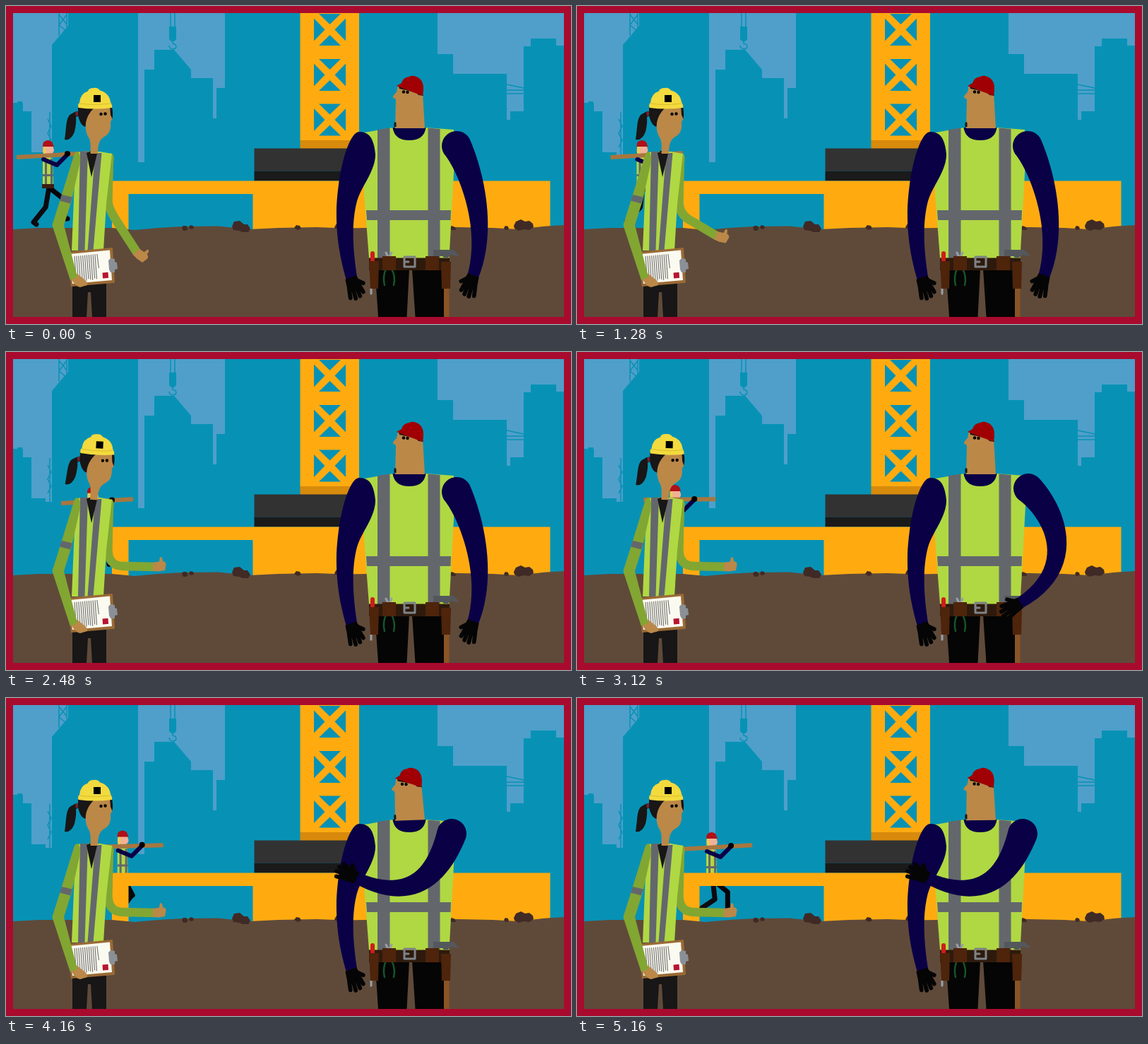
Animation, 800 px wide and 450 px high, one loop 5200 ms. Source, as an HTML page:

```html
<!DOCTYPE html>
<html lang="en">
<head>
<meta charset="utf-8">
<title>Building site</title>
<style>
  html, body { margin: 0; width: 100%; height: 100%; overflow: hidden; background: #a80b2d; }
  svg { display: block; width: 800px; height: 450px; }
  .sky { fill: #0792b5; }
  .far { fill: #4f9fca; }
  .thin { fill: none; stroke: #0792b5; stroke-width: 1.5; }
  .crane { fill: #ffab10; }
  .rock { fill: #402a25; }
  .soil { fill: #5f4a3a; }
  .vest { fill: #b0d843; }
  .sleeve { fill: #82a632; }
  .band { fill: #63676c; }
  .navy { fill: #0a0046; }
  .skin { fill: #bb8848; }
  .dark { fill: #181616; }
  .pouch { fill: #4e240b; }
  .line { fill: none; stroke-linecap: round; stroke-linejoin: round; }
</style>
</head>
<body>
<svg viewBox="0 0 800 450">
  <defs>
    <path id="brace" class="sky" d="M7 0H38L22.5 15ZM7 45H38L22.5 30ZM0 6.5V38.5L15.500 22.5ZM45 6.5V38.5L29.500 22.5Z"/>
    <g id="glove" class="line" stroke="#050505" stroke-width="5.500">
      <path d="M-2 -8L12 -10Q18 -8 18 0Q18 9 11 10L-2 8Z" fill="#050505" stroke="none"/>
      <path d="M12 -7.500L24 -10M14 -2.500L27 -3.500M14 3L26 3M11 7L22 9M4 6L11 13"/>
    </g>
  </defs>

  <rect class="sky" width="800" height="450"/>
  <g class="far">
    <path d="M10 10H88V28L65 55V212H56V207H36V149H24V137H10Z"/>
    <path d="M187 10H310V116H298V159H293V102H262V90L238 62H210V90H196V221H187Z"/>
    <path d="M611 10H790V56H779V46H743V57H733V149H714V161H709V96H633V68H611Z"/>
  </g>
  <path class="sky" d="M16 135h7v4h-7zM231 29h10v18l-3 3h-4l-3-3z"/>
  <path class="thin" d="M75 10V42M86 10V30M75 12L86 26M86 12L75 27M75 27L86 36M62 150V212M59 160L64 170L59 180L64 190L59 200M233 10V30M239 10V30M236 48V53C244 55 241 61 236 61Q231 60 231 56M709 111L733 116M709 119H733M709 124H733"/>

  <g id="walker">
    <path id="farLeg" class="line" stroke="#0b0b10" stroke-width="7"/>
    <path id="nearLeg" class="line" stroke="#050508" stroke-width="7"/>
    <g id="trunk">
      <path class="vest" d="M37 215H51L52 253H37Z"/>
      <path class="band" d="M40 216h3v36h-3zM48 216h3v36h-3zM37 238h15v3h-15z"/>
      <path fill="#3b1f12" d="M36 252h17v6h-17z"/>
      <path fill="#eecb50" d="M38 197H43V207L39 212Q36 207 38 197Z"/>
      <path fill="#f1b196" d="M41 197H51L53 204Q52 209 48 210V215H42Z"/>
      <path fill="#b01018" d="M37 199Q36 191 44 190Q51 190 52 197L53 199Z"/>
    </g>
    <path id="plank" stroke="#a8763e" stroke-width="6"/>
    <g id="grip">
      <path class="line" stroke="#0a0046" stroke-width="6" d="M38 217L57 225L70 212"/>
      <circle cx="72" cy="209" r="4"/>
    </g>
  </g>

  <path class="crane" d="M416.500 10H500V190H416.500Z"/>
  <use href="#brace" x="436" y="11"/><use href="#brace" x="436" y="75"/><use href="#brace" x="436" y="138.500"/>
  <path fill="#d78a0c" d="M416.500 190h83.500v12h-83.500z"/>
  <path fill="#323232" d="M351.500 201.500h209v32h-209z"/>
  <path fill="#1a1a1a" d="M351.500 233.500h209v14h-209z"/>
  <path class="crane" d="M150 247.500H770.500V318H349.500V266H173.500V318H150Z"/>

  <path class="soil" d="M10 316L45 314L95 314L150 314L182 317L215 314L250 312L300 311.500L345 316L385 314L440 313L480 314.500L560 313H640L690 314L725 316L760 312L790 310V440H10Z"/>
  <path class="rock" d="M249 314l2-3 4 0 3 4-3 3h-4zM259 313l2-3 4 1 1 4-5 1zM320 312l3-7 8-1 6 5 5 0 4 6-3 5-8 0-5-2-8-1zM408 314l3-4 5 1 2 4-5 2zM465 313l3-5 5 3 1 4h-8zM628 314l3-3 5 2 1 4h-6zM705 314l2-3 4 1 1 4-5 1zM719 311l3-6 7-3 6 3 6-1 5 4 1 5-6 4-8-1-7 2-6-3z"/>

  <!-- woman -->
  <path class="dark" d="M94 390H142V440H122L120 405H116L114 440H94Z"/>
  <path id="foreArm" class="line" stroke="#82a632" stroke-width="12.500" style="stroke-linecap:butt"/>
  <path class="band" d="M140 247h10.500l-.5 9h-10z"/>
  <path id="thumb" class="skin" d="M-2 -6L7 -7.500L8 -13.500Q11.500 -15 12 -8Q17 -7 16.500 -3L15 5L6 6.500L-2 6Z"/>
  <path class="sleeve" d="M141 209L150 208.500Q154 212 152 222L150.500 270H138Z"/>
  <path class="vest" d="M99 207L117 206H133L150 209L142 280L138 346H93L97 250Z"/>
  <path class="band" d="M105 206H116L111.500 346H102ZM126 208H135.500L123.500 346H115.500Z"/>
  <path class="dark" d="M114 208L118 206H126L129 209L121 242Z"/>
  <path fill="#9a6a35" d="M87 348L150 342Q151 342 151 343L154 390Q154 392 152 392L92 397Z"/>
  <path fill="#fbfaf0" d="M90 351L147 345.500L150 388L94 393Z"/>
  <path id="writing" stroke="#777" stroke-width="1.200"/>
  <path fill="#b81530" d="M136.500 377.500l8-.7.6 8-8 .7z"/>
  <path fill="#8b9097" d="M145 360l3-3 6 1v4l3 1 1 9-4 1 0 4-6 0-2-4z"/>
  <path class="skin" d="M92 380L101 379L111 387Q116 391 115 395L105 398Q97 396 93 387Z"/>
  <path class="sleeve" d="M101 206Q106 208 105 220L93 275L82 310L101 383L91 388L66 312Q65 309 67 305L78 270L96 212Q97 207 101 206Z"/>
  <path class="band" d="M79 267L94 270.500L91 279.500L76 275.500Z"/>
  <g id="herHead">
    <path class="dark" d="M103 149Q97 149 94 152C84 155 86 172 83 189Q92 191 97 178Q100 165 99 157L104 155Z"/>
    <path fill="#6d2432" d="M98 150l4-1 1 6-4 1z"/>
    <path class="dark" d="M102 142H128V160L115 171Q106 172 102 155Z"/>
    <path class="skin" d="M125 144L148 143L148.500 153L151 159L148 164C149 176 146 181 139 185C132 189 130 197 130 209H119.500C120 198 120 191 117 186C110 174 111 157 125 144Z"/>
    <path class="dark" d="M147 142L150 143Q152 151 150.500 160L148 154Z"/>
    <circle cx="134.500" cy="153" r="2.200"/><circle cx="140.500" cy="152.500" r="2.200"/>
    <path fill="#f3da3e" d="M102.500 144Q101 139 104 137Q105 124 116 120.500Q117 116 124 116Q130 115 133 119.500Q146 123 148 136Q151 141 150 144Q125 147 102.500 144Z"/>
    <path class="line" stroke="#d8be2c" stroke-width="1" d="M104 138Q125 141 148 138"/>
    <rect x="124" y="126" width="10" height="10"/>
  </g>

  <!-- man -->
  <path d="M522 366H620V440H579.500L575 372H571L567.500 440H527Z" fill="#050505"/>
  <path fill="#8a5426" d="M620 354h7.500v86h-7.500z"/>
  <path class="vest" d="M502 180L548 172H594L634 175L636 200L627.500 357H514L507 265Z"/>
  <path class="band" d="M526 175L543.500 172.500V357H526ZM597.500 172.500L614.500 174V357H597.500ZM510 289H630L629.500 303H511Z"/>
  <path class="navy" d="M547.500 172H594.500Q592 190 571 190Q550 190 547.500 172Z"/>
  <path fill="#2e1a0d" d="M514 356.500h114v17.500h-114z"/>
  <path class="line" stroke="#7f8388" stroke-width="3" d="M564 355h15v14h-15zM565 362h5"/>
  <path class="line" stroke="#9b9fa3" stroke-width="3" d="M538 349L541 355M546 349L543 355M517 400V407"/>
  <path class="line" stroke="#15552a" stroke-width="2.500" d="M538 372Q533 383 536 395M546 372Q552 383 549 395"/>
  <path class="line" stroke="#d01c1c" stroke-width="6" d="M519 350V360"/>
  <path class="pouch" d="M514 361h14l-1 39h-11zM533 354h19v20h-19zM594 354h19v20h-19zM616 362h14l-1 38h-12z"/>
  <path fill="#54585c" d="M605 345h28l8 7-2 2-9-2-4 4h-6l-2-2h-13z"/>
  <path class="navy" d="M500 178C487 178 471 225 468 285C467 330 474 360 482 388L497 383C492 350 488 310 497 276C503 255 523 234 523 210C521 187 514 178 500 178Z"/>
  <use href="#glove" transform="translate(489 386) rotate(70) scale(1.05 -1.05)"/>
  <g id="hisHead">
    <path class="skin" d="M555 112L590 122L593 173H551L552 132L547.500 129Q549 125 553 122Z"/>
    <path class="dark" d="M556 113L588 119L591 127L584 126L580 122L557 117ZM549.500 165q3-2 3 1v5h-3z"/>
    <circle cx="563" cy="121.500" r="2.200"/><circle cx="568.500" cy="122" r="2.200"/>
    <path fill="#a00003" d="M553 113L560 109Q562 101 571 100Q575 97.500 581 100Q592 104 591 120L590 127Q573 121 553 113Z"/>
  </g>
  <path id="hisArm" class="navy"/>
  <use id="hisHand" href="#glove"/>

  <path fill="none" stroke="#a80b2d" stroke-width="10" d="M5 5H795V445H5Z"/>
</svg>
<script>
const LOOP = 5200, TICK = 40, TAU = Math.PI * 2;
const $ = id => document.getElementById(id);
const draw = (id, d) => $(id).setAttribute('d', d);
const place = (id, v) => $(id).setAttribute('transform', v);
const mix = (a, b, k) => a + (b - a) * k;
const mixAll = (a, b, k) => a.map((v, i) => mix(v, b[i], k));
const smooth = (a, b, t) => {
  const k = Math.min(1, Math.max(0, (t - a) / (b - a)));
  return k * k * (3 - 2 * k);
};

// Eased value between [time, value] stops.
function track(t, stops) {
  let v = stops[0][1];
  for (let i = 1; i < stops.length; i++) {
    v += (stops[i][1] - stops[i - 1][1]) * smooth(stops[i - 1][0], stops[i][0], t);
  }
  return v;
}

// Two-bone leg with the knee bending forward.
function leg(hipX, hipY, q) {
  const bone = 29, swing = q >= .5 ? (q - .5) * 2 : 0;
  const x = hipX + (q < .5 ? mix(23, -22, smooth(.05, .24, q)) : mix(-22, 23, smooth(0, 1, swing)));
  const y = q < .5 ? mix(303, 308, q * 2) : mix(308, 303, swing) - 13 * Math.sin(Math.PI * swing);
  const dx = x - hipX, dy = y - hipY, d = Math.hypot(dx, dy);
  const bend = Math.sqrt(Math.max(0, bone * bone - d * d / 4));
  const kx = hipX + dx / 2 + dy / d * bend, ky = hipY + dy / 2 - dx / d * bend;
  const drop = q >= .5 ? 3 * (1 - swing) : 0;
  return `M${hipX} ${hipY}L${kx} ${ky}L${x} ${y - 2}l4 ${drop}`;
}

function walker(t) {
  const step = t / 1290, stride = t / 2500;
  const bob = -2 * Math.cos(TAU * (step - .3)) - .6;
  place('walker', `translate(${15 + t * .0254} 0)`);
  place('trunk', `translate(0 ${bob})`);
  place('grip', `translate(0 ${bob / 2})`);
  draw('plank', `M0 ${211.5 + 2.6 * Math.cos(TAU * (step + .06))}L102 208.3`);
  draw('farLeg', leg(46, 256 + bob, (stride + .5) % 1));
  draw('nearLeg', leg(45, 256 + bob, stride % 1));
}

function woman(t) {
  const k = smooth(200, 2300, t);
  const x = mix(185.5, 210, k), y = mix(349, 304, k);
  draw('foreArm', `M145.500 220L144.500 275Q${mix(144, 143, k)} ${mix(285, 303, k)} ${mix(157, 166, k)} ${mix(305, 303, k)}L${x} ${y}`);
  place('thumb', `translate(${x} ${y}) rotate(${mix(43, 0, k)})`);
  const nod = track(t, [[0, 0], [440, 1.4], [1280, 0], [2480, 3], [3120, 1.4], [3380, 0]]);
  place('herHead', `rotate(${nod} 122 200)`);
}

// Arm poses: four Bezier points, shoulder to wrist.
const hang = [638, 198, 655, 226, 686, 310, 661, 383];
const hip = [639, 193, 672, 222, 716, 302, 626, 356];
const cross = [631, 192, 612, 250, 575, 293, 495, 254];

function bezier(p, s) {
  const r = 1 - s, w = [r * r * r, 3 * r * r * s, 3 * r * s * s, s * s * s];
  const at = o => w.reduce((sum, v, i) => sum + v * p[i * 2 + o], 0);
  return [at(0), at(1)];
}

function man(t) {
  const p = t < 3120 ? mixAll(hang, hip, smooth(2820, 3120, t))
                     : mixAll(hip, cross, smooth(3120, 3720, t));
  const left = [], right = [], n = 24;
  for (let i = 0; i <= n; i++) {
    const s = i / n, [x, y] = bezier(p, s);
    const [ax, ay] = bezier(p, s - .01), [bx, by] = bezier(p, s + .01);
    const a = Math.atan2(by - ay, bx - ax);
    const w = s < .5 ? mix(21, 14.5, s * 2) : mix(14.5, 8, s * 2 - 1);
    left.push([x + Math.sin(a) * w, y - Math.cos(a) * w]);
    right.unshift([x - Math.sin(a) * w, y + Math.cos(a) * w]);
  }
  draw('hisArm', `M${left.join('L')}L${right.join('L')}A21 21 0 0 1 ${left[0]}Z`);
  const turn = Math.atan2(p[7] - p[5], p[6] - p[4]) * 360 / TAU;
  place('hisHand', `translate(${p[6]} ${p[7]}) rotate(${turn}) scale(1.05)`);
  const tilt = track(t, [[3940, 0], [4180, -2.3], [4500, -2.3], [5200, -.4]]);
  place('hisHead', `rotate(${tilt} 572 172)`);
}

// The sheet lies on its side, so its lines run down the board.
let lines = '';
for (let i = 0; i < 12; i++) {
  lines += `M${97 + i * 2.9} ${354 - i * .27}l2.500 ${i == 11 ? 20 : 34 + i % 3}`;
}
draw('writing', lines);

const start = performance.now();
function frame() {
  const t = Math.floor((performance.now() - start) % LOOP / TICK) * TICK;
  walker(t);
  woman(t);
  man(t);
  requestAnimationFrame(frame);
}
frame();
</script>
</body>
</html>
```
